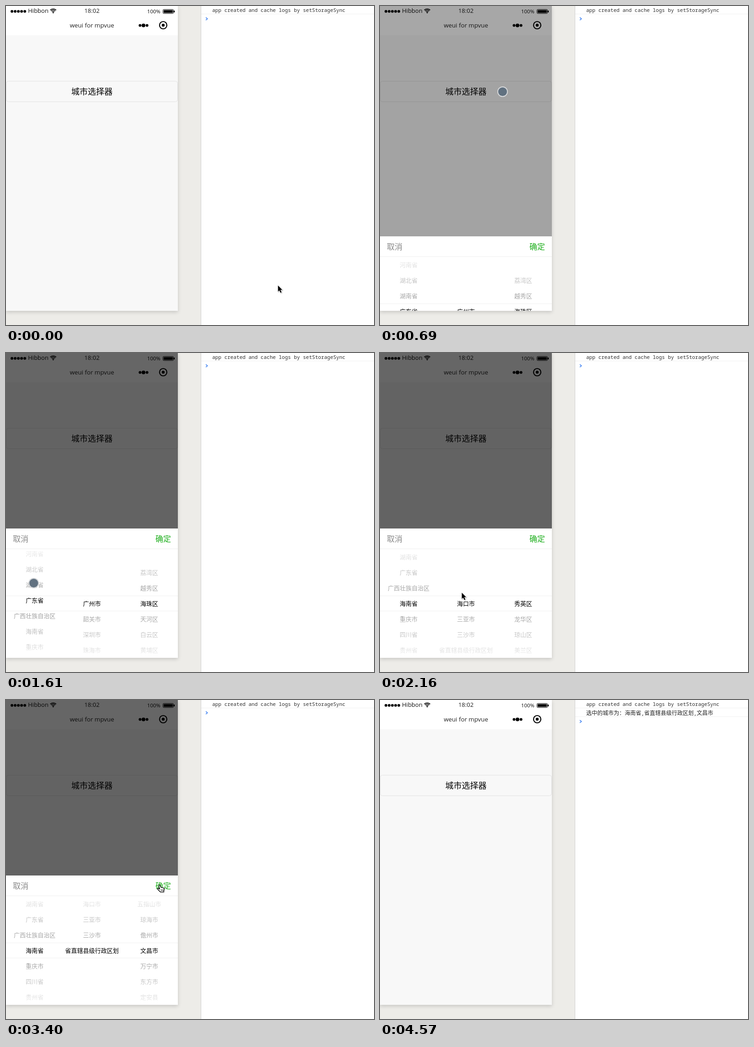
Animation of 803x698 px, one loop 5.03 s. Source, as an HTML page with a canvas:

```html
<!DOCTYPE html>
<html lang="zh-CN">
<head>
<meta charset="utf-8">
<title>City picker</title>
<style>
html, body { margin: 0; width: 100%; height: 100%; overflow: hidden; background: #edece8; }
canvas { display: block; }
</style>
</head>
<body>
<canvas id="stage" width="803" height="698"></canvas>
<script>
const c = document.getElementById('stage').getContext('2d');
const LOOP = 5030, PHONE_W = 375, PHONE_H = 667, ROW = 34;
const CJK = '"Noto Sans CJK SC", "Noto Sans CJK", sans-serif';
const UI = '"Open Sans", "Noto Sans", sans-serif';
const MONO = '"Noto Sans Mono", "DejaVu Sans Mono", monospace';

const provinces = '河南省 湖北省 湖南省 广东省 广西壮族自治区 海南省 重庆市 四川省 贵州省 云南省'.split(' ');
const gdCities = '广州市 韶关市 深圳市 珠海市 汕头市'.split(' ');
const hnCities = '海口市 三亚市 三沙市 省直辖县级行政区划'.split(' ');
const gzAreas = '荔湾区 越秀区 海珠区 天河区 白云区 黄埔区 番禺区'.split(' ');
const hkAreas = '秀英区 龙华区 琼山区 美兰区'.split(' ');
const hnCounties = '五指山市 琼海市 儋州市 文昌市 万宁市 东方市 定安县'.split(' ');

// Pointer path: time, x, y
const path = [
  [0, 593, 611], [40, 593, 611], [370, 264, 179], [860, 264, 179], [970, 153, 511],
  [1060, 131, 510], [1380, 57, 512], [1550, 57, 512], [1800, 57, 444], [1990, 140, 510],
  [2160, 178, 524], [2250, 190, 511], [2500, 190, 409], [2620, 310, 415], [2690, 320, 424],
  [2860, 323, 425], [2930, 312, 454], [3080, 312, 352], [3170, 322, 415], [3240, 326, 415],
  [3470, 340, 401], [3900, 340, 401], [4080, 244, 272], [4160, 268, 300], [4400, 649, 676],
  [4490, 684, 688], [LOOP, 684, 688]
];
const presses = [[520, 860], [1550, 1820], [2250, 2520], [2930, 3150]];
const hands = [[350, 520], [3400, 3990]];
// Moments when the screen stands still: start, length
const holds = [[690, 60], [1060, 80], [2160, 70], [2860, 80]];

const clamp = v => Math.max(0, Math.min(1, v));
const ramp = (t, a, b) => clamp((t - a) / (b - a));
const smooth = v => v * v * (3 - 2 * v);
const within = (t, spans) => spans.some(([a, b]) => t >= a && t < b);

function pointerAt(t) {
  const i = path.findIndex(k => k[0] > t);
  const [t0, x0, y0] = path[i - 1], [t1, x1, y1] = path[i];
  const k = ramp(t, t0, t1);
  return [Math.round(x0 + (x1 - x0) * k), Math.round(y0 + (y1 - y0) * k)];
}

function rect(x, y, w, h, color) {
  c.fillStyle = color;
  c.fillRect(x, y, w, h);
}

function text(str, x, y, size, color, family = CJK, align = 'left') {
  c.font = `${size}px ${family}`;
  c.textAlign = align;
  c.fillStyle = color;
  c.fillText(str, x, y);
}

function disc(x, y, r, color) {
  c.fillStyle = color;
  c.beginPath();
  c.arc(x, y, r, 0, 7);
  c.fill();
}

function ring(x, y, r, width, color, from = 0, to = 7) {
  c.strokeStyle = color;
  c.lineWidth = width;
  c.beginPath();
  c.arc(x, y, r, from, to);
  c.stroke();
}

function box(x, y, w, h, r, color) {
  c.strokeStyle = color;
  c.lineWidth = 1;
  c.beginPath();
  c.roundRect(x, y, w, h, r);
  c.stroke();
}

function drawStatus() {
  for (let i = 0; i < 5; i++) disc(13 + i * 7, 11.7, 3, '#000');
  text('Hibbon', 48, 15, 13, '#111', UI);
  for (const r of [3.5, 6.5, 9.2]) ring(103, 15.5, r, 1.7, '#000', -2.35, -0.79);
  disc(103, 14.7, 1.3, '#000');
  text('18:02', 187.5, 15, 13, '#222', UI, 'center');
  text('100%', 308, 16, 11.4, '#111', UI);
  box(342.5, 7.5, 23, 9, 2, '#000');
  rect(344, 9, 20, 6, '#000');
  rect(366, 10, 2, 4, '#000');
  text('weui for mpvue', 187.5, 47, 13.3, '#222', UI, 'center');
  disc(292.5, 42.5, 3, '#000');
  disc(300, 42.5, 4, '#000');
  disc(307.7, 42.5, 3, '#000');
  ring(343, 42, 8, 2.2, '#000');
  disc(343, 42, 3.2, '#000');
}

function drawPage() {
  c.save();
  c.shadowColor = 'rgba(0,0,0,.16)';
  c.shadowBlur = 8;
  c.shadowOffsetY = 3;
  rect(0, 0, PHONE_W, PHONE_H, '#f8f8f8');
  c.restore();
  rect(0, 0, PHONE_W, 64, '#fff');
  drawStatus();
  box(0.5, 164.5, 374, 45, 5, '#e2e2e2');
  text('城市选择器', 187.5, 194, 18, '#000', CJK, 'center');
}

function drawColumn(items, offset, x, top) {
  items.forEach((item, i) => {
    const y = top + 164 + (i - offset) * ROW;
    if (y > top + 30 && y < top + 300) text(item, x, y + 5, 13, '#000', CJK, 'center');
  });
}

function fade(y, from, to) {
  const g = c.createLinearGradient(0, y, 0, y + 102);
  g.addColorStop(0, `rgba(255,255,255,${from})`);
  g.addColorStop(1, `rgba(255,255,255,${to})`);
  rect(0, y, PHONE_W, 102, g);
}

function drawPicker(t) {
  const shown = 1 - (1 - ramp(t, 585, 885)) ** 2;
  const top = Math.round(PHONE_H - 283 * shown);
  c.save();
  c.beginPath();
  c.rect(0, 0, PHONE_W, PHONE_H);
  c.clip();
  rect(0, 0, PHONE_W, PHONE_H, `rgba(0,0,0,${0.6 * shown})`);
  rect(0, top, PHONE_W, 283, '#fff');

  const inHainan = t >= 1900, inCounties = t >= 2580;
  drawColumn(provinces, 3 + 2 * smooth(ramp(t, 1550, 1850)), 62.5, top);
  drawColumn(inHainan ? hnCities : gdCities, 3 * smooth(ramp(t, 2260, 2560)), 187.5, top);
  if (inCounties) drawColumn(hnCounties, 3 * smooth(ramp(t, 2940, 3280)), 312.5, top);
  else drawColumn(inHainan ? hkAreas : gzAreas, inHainan ? 0 : 2, 312.5, top);

  fade(top + 45, 0.95, 0.6);
  fade(top + 181, 0.6, 0.95);
  rect(0, top + 147, PHONE_W, 1, '#f0f0f0');
  rect(0, top + 180, PHONE_W, 1, '#f0f0f0');
  rect(0, top, PHONE_W, 44, '#fff');
  rect(0, top + 44, PHONE_W, 1, '#eee');
  text('取消', 15, top + 29, 17, '#888');
  text('确定', 360, top + 29, 17, '#1aad19', CJK, 'right');
  c.restore();
}

function drawConsole(done) {
  rect(425, 0, 1, 698, '#d0d0d0');
  rect(426, 0, 377, 698, '#fff');
  text('app created and cache logs by setStorageSync', 450, 13, 11, '#303030', MONO);
  rect(426, 17, 377, 1, '#f0f0f0');
  if (done) {
    text('选中的城市为：海南省', 450, 33, 12, '#222');
    text(',', 570, 33, 11, '#222', MONO);
    text('省直辖县级行政区划', 576.6, 33, 12, '#222');
    text(',', 684.6, 33, 11, '#222', MONO);
    text('文昌市', 691, 33, 12, '#222');
    rect(426, 36, 377, 1, '#f0f0f0');
  }
  const y = done ? 47 : 28;
  c.strokeStyle = '#367cf1';
  c.lineWidth = 1.6;
  c.beginPath();
  c.moveTo(436, y - 3);
  c.lineTo(439.5, y);
  c.lineTo(436, y + 3);
  c.stroke();
}

const arrow = new Path2D('M.5 .5V14L3.5 11.2 6 16.6 8.3 15.6 5.9 10.3H10Z');
const hand = new Path2D('M3.5 2.5Q4 .5 6 1.5L8 6 13 7Q15 7.5 15 9.5L14 16H7L1 10Q0 8 2.5 8.2L5.5 10Z');
const knuckles = new Path2D('M8.5 10V14M10.7 10V14M12.7 10.5V14');

function drawPointer(t) {
  const [x, y] = pointerAt(t);
  if (within(t, presses)) {
    disc(x + 3.5, y + 8.5, 11.5, '#d6d8da');
    disc(x + 3.5, y + 8.5, 9.6, '#617180');
    return;
  }
  if (t >= 4560) return;
  const isHand = within(t, hands);
  c.save();
  c.translate(isHand ? x - 6 : x, isHand ? y - 1 : y);
  c.lineJoin = 'round';
  c.shadowColor = 'rgba(0,0,0,.3)';
  c.shadowBlur = 2;
  c.shadowOffsetX = c.shadowOffsetY = 1;
  c.fillStyle = '#fff';
  c.strokeStyle = isHand ? '#000' : '#fff';
  c.lineWidth = isHand ? 1.2 : 1.5;
  const shape = isHand ? hand : arrow;
  c.stroke(shape);
  c.shadowColor = 'transparent';
  if (!isHand) c.fillStyle = '#000';
  c.fill(shape);
  if (isHand) {
    c.stroke(shape);
    c.lineWidth = 0.8;
    c.stroke(knuckles);
  }
  c.restore();
}

function draw(now) {
  let t = now % LOOP;
  for (const [start, length] of holds) if (t >= start && t < start + length) t = start;
  const done = t >= 3780;
  rect(0, 0, 803, 698, '#edece8');
  drawPage();
  if (t > 585 && !done) drawPicker(t);
  drawConsole(done);
  drawPointer(t);
}

const begin = performance.now();
function tick() {
  draw(performance.now() - begin);
  requestAnimationFrame(tick);
}
tick();
</script>
</body>
</html>
```
